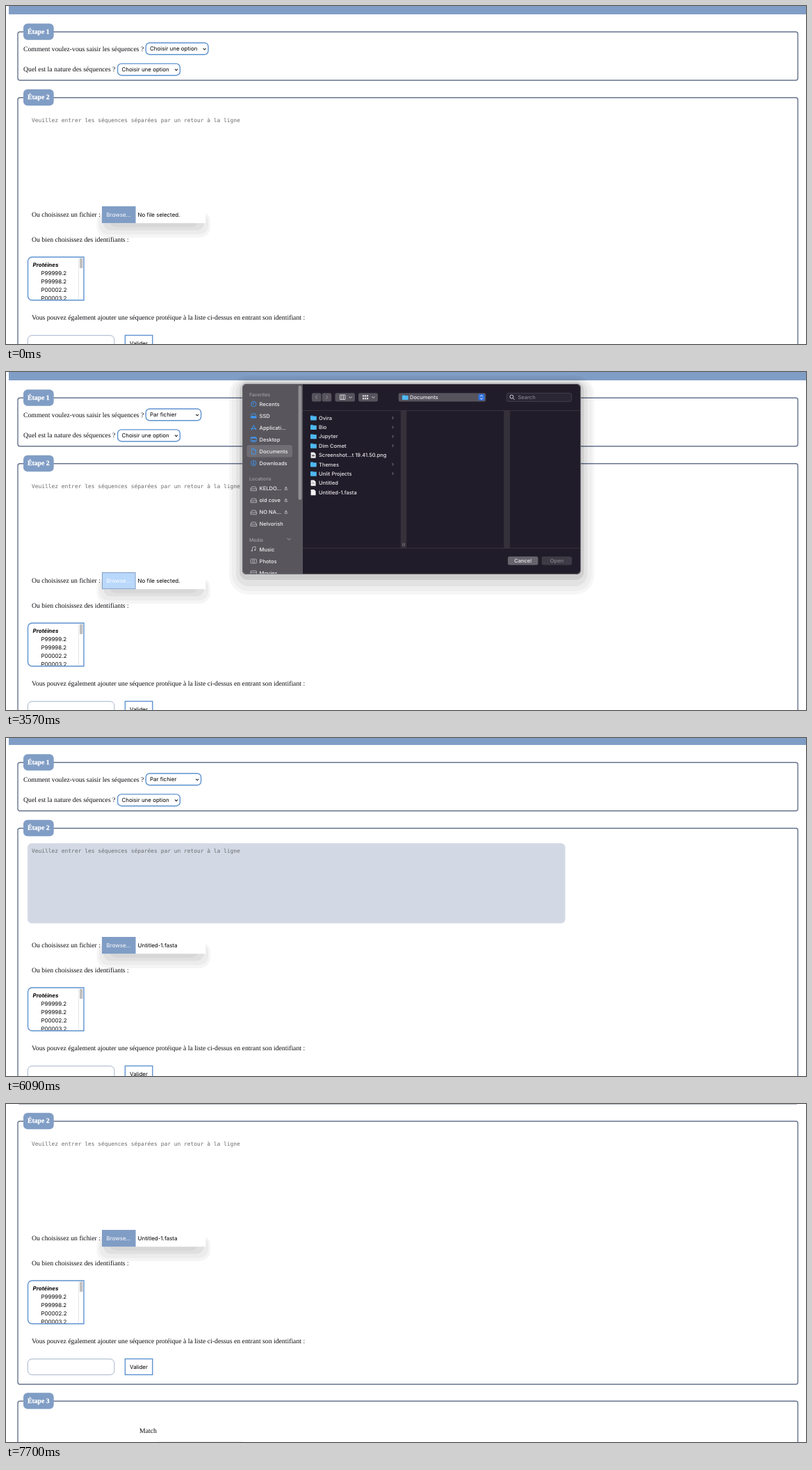
These frames come from a looping animation (1151x486 px, 8000 ms). An HTML page:

```html
<!DOCTYPE html>
<html lang="fr">
<head>
<meta charset="utf-8">
<title>Saisie de séquences</title>
<style>
html, body { margin: 0; width: 100%; height: 100%; overflow: hidden; background: #fff; }
svg { display: block; width: 1151px; height: 486px; }
text { white-space: pre; text-rendering: geometricPrecision; }
.serif { font: 9.74px "Liberation Serif", serif; fill: #0c0c12; }
.legend { font: bold 9.74px "Liberation Serif", serif; fill: #fff; stroke: #fff; stroke-width: .25px; }
.ui { font: 7.95px Inter, sans-serif; fill: #000; }
.mono { font: 7.91px "DejaVu Sans Mono", monospace; fill: #6c6c70; }
.side { font: 500 7.5px Inter, sans-serif; fill: #f1f0f2; }
.head { font: 500 6.8px Inter, sans-serif; fill: #a3a1a7; }
.file { font: 500 7.5px Inter, sans-serif; fill: #e9e8eb; }
.white { fill: #fff; }
.dim { fill: #85828c; }
.mid { text-anchor: middle; }
</style>
</head>
<body>
<svg id="stage" viewBox="0 0 1151 486" xmlns="http://www.w3.org/2000/svg"></svg>
<script>
const LOOP = 8000, STEP = 70;
const BLUE = '#809dc5', EDGE = '#5f93d0', ACCENT = '#3f97f5';

const rect = (x, y, w, h, fill, r = 0, extra = '') =>
  `<rect x="${x}" y="${y}" width="${w}" height="${h}" rx="${r}" fill="${fill}" ${extra}/>`;
const text = (x, y, cls, str, extra = '') => `<text x="${x}" y="${y}" class="${cls}" ${extra}>${str}</text>`;
const line = (d, stroke, w = 1, extra = '') =>
  `<path d="${d}" fill="none" stroke="${stroke}" stroke-width="${w}" ${extra}/>`;
const group = (id, body, extra = '') => `<g id="${id}" ${extra}>${body}</g>`;
const frame = (x, y, w, h, stroke, sw, r, fill = 'none') =>
  rect(x, y, w, h, fill, r, `stroke="${stroke}" stroke-width="${sw}"`);

// Form page

const fieldset = (y, h, n) =>
  frame(17, y, 1122.3, h, '#66748e', 1.4, 3) +
  rect(25, y - 12, 43.7, 23.4, BLUE, 6) +
  text(46.8, y + 2.6, 'legend mid', `Étape ${n}`);

const select = (x, y, w, label) =>
  frame(x + .6, y + .6, w - 1.2, 16.8, EDGE, 1.4, 5.5, '#fff') +
  text(x + 6.4, y + 11.9, 'ui', label) +
  line(`M${x + w - 8} ${y + 8.4}l2 2 2-2`, '#222', 1.1);

// Soft shadow built from nested bands: [x, y, width, height, radius, opacity]
const shadow = bands => bands.map(([x, y, w, h, r, o]) =>
  rect(x, y, w, h, '#000', r, `opacity="${o}"`)).join('');

function filePicker() {
  return shadow([
    [130.5, 295, 163.5, 38, 15, .04], [134, 297, 157, 31.5, 13, .035],
    [140, 299, 145, 23.5, 11, .05], [149, 300, 127, 18, 9, .04]
  ]) +
    rect(138, 288, 149.3, 24.2, '#fff') +
    rect(138, 288, 48.6, 24.2, BLUE) +
    rect(139, 289, 46.6, 22.2, '#b9d8fb', 0, 'id="hover"') +
    text(162, 303, 'ui white mid', 'Browse…') +
    text(189.6, 303, 'ui', 'No file selected.', 'id="fileName"');
}

function idList() {
  const ids = ['P99999.2', 'P99998.2', 'P00002.2', 'P00003.2'];
  return `<path d="M112 361H37.500a6 6 0 0 0-6 6v50a6 6 0 0 0 6 6H112z" fill="#fff" stroke="${EDGE}" stroke-width="1.400"/>` +
    line('M104.500 362V422', '#e6e6e6') +
    rect(106, 362.5, 4.4, 14.5, '#c1c1c1', 1) +
    text(38.6, 375.3, 'ui', 'Protéines', 'font-weight="700" style="font-weight:700;font-style:italic"') +
    `<g clip-path="url(#listClip)">${ids.map((s, i) => text(50.5, 386.6 + i * 12.1, 'ui', s)).join('')}</g>`;
}

const page = group('page',
  rect(4, -60, 1147, 72, BLUE) +
  fieldset(37.3, 69.5, 1) +
  text(25, 64.6, 'serif', 'Comment voulez-vous saisir les séquences ?') +
  group('choiceA', select(200.6, 52.4, 91, 'Choisir une option')) +
  group('choiceB', select(200.6, 52.4, 80.6, 'Par fichier')) +
  text(25, 94.4, 'serif', 'Quel est la nature des séquences ?') +
  select(160, 82.3, 91, 'Choisir une option') +
  fieldset(131.8, 378.2, 2) +
  rect(31, 153.3, 773.6, 115.2, '#d3d9e4', 6, 'id="area"') +
  text(37, 167.1, 'mono', 'Veuillez entrer les séquences séparées par un retour à la ligne') +
  text(37, 303.4, 'serif', 'Ou choisissez un fichier :') +
  filePicker() +
  text(37, 338.5, 'serif', 'Ou bien choisissez des identifiants :') +
  idList() +
  text(37, 450.9, 'serif', 'Vous pouvez également ajouter une séquence protéique à la liste ci-dessus en entrant son identifiant :') +
  frame(31.3, 473.7, 124.6, 22.6, '#a3b4ca', 1, 6) +
  frame(171.4, 473.5, 39.4, 22.8, EDGE, 1.4, 0) +
  text(191, 488, 'ui mid', 'Valider') +
  fieldset(534.2, 300, 3) +
  text(192, 580, 'serif', 'Match') +
  rect(212, 592, 135, 20, '#f1f1f1', 9)
);

// Option menu under the first select

const menu = group('menu',
  shadow([[195.5, 69.5, 102.5, 48, 7, .04], [198, 70.5, 97.5, 44, 5, .07]]) +
  frame(200, 71.4, 94, 40.6, '#c9c9cc', .6, 2.5, '#fff') +
  rect(200.3, 72, 93.4, 13, '#3d7be0', 2, 'id="mark"') +
  ['Manuellement', 'Par fichier', 'Par identifiant'].map((s, i) =>
    text(207, 81.4 + i * 13, 'ui opt', s)).join('')
);

// File dialog

const disk = y => line(`M352 ${y + .5}l1.500-3h5.500l1.500 3v2.700h-8.500zM352 ${y + .5}h8.500`, '#b9b7bc', .9);
const icons = {
  Recents: line('M360 46a3.700 3.700 0 1 1-7.400 0a3.700 3.700 0 1 1 7.400 0M356.300 43.500V46h-2', ACCENT, .9),
  SSD: rect(352, 63.2, 8.4, 3.2, ACCENT, 1) + line('M352.500 63l1.500-3h4.500l1.500 3', ACCENT, .9),
  'Applicati...': line('M353 83.500l3.300-7 3.300 7M352 81.500h8.500', ACCENT, 1),
  Desktop: frame(352.3, 93.8, 8, 6.4, ACCENT, .9, .8) + rect(352.3, 93.8, 8, 1.8, ACCENT) + rect(353.6, 98, 5.4, 1.3, ACCENT),
  Documents: line('M353.500 110h3.300l2.500 2.500v5.500h-5.800zM356.600 110v2.700h2.700', ACCENT, .9),
  Downloads: line('M360 131a3.700 3.700 0 1 1-7.400 0a3.700 3.700 0 1 1 7.400 0M356.300 128.700v4.300m-1.600-1.500l1.600 1.600 1.600-1.600', ACCENT, .9)
};

function sidebar() {
  const fav = Object.keys(icons).map((s, i) =>
    icons[s] + text(364.6, 48.8 + i * 17, 'side', s)).join('');
  const drives = ['KELDO...', 'old cove', 'NO NA...', 'Nelvorish'].map((s, i) => {
    const y = 167.5 + i * 17;
    const eject = i < 3 ? `<path d="M400.500 ${y}l2.300-3 2.300 3zM400.500 ${y + 1}h4.600v1.200h-4.600z" fill="#aaa8ad"/>` : '';
    return disk(y) + eject + text(364.6, y + 2.7, 'side', s);
  }).join('');
  const grey = '#b9b7bc';
  const media =
    line('M354.500 257v-5l4.500-1v5', grey, .9) + rect(352.5, 256, 2.4, 2, grey, 1) + rect(357, 255, 2.4, 2, grey, 1) +
    frame(352, 269, 8.4, 6, grey, .9, 1) + `<circle cx="356.200" cy="272" r="1.700" fill="none" stroke="${grey}" stroke-width=".8"/>` +
    frame(352, 286, 8.4, 6, grey, .9, .5) + line('M352 288.500h8.400', grey, .8) +
    ['Music', 'Photos', 'Movies'].map((s, i) => text(364.6, 257.7 + i * 17, 'side', s)).join('');
  return rect(340, 17, 87, 274, '#58565c') +
    rect(346.5, 105, 65.5, 17.4, '#706e74', 3) +
    rect(420.6, 19.5, 4.8, 164.5, '#918f95', 2.4) +
    text(350, 34.6, 'head', 'Favorites') + fav +
    text(350, 156.4, 'head', 'Locations') + drives +
    text(350, 243.6, 'head', 'Media') + line('M404.500 239l2.500 2.500 2.500-2.500', '#a3a1a7', 1) + media;
}

const folder = (x, y) => rect(x, y - 3.5, 4, 3, '#2f9bdc', .8) + rect(x, y - 2.6, 8.8, 6.2, '#4fb9f2', .8);
const sheet = (x, y) => `<path d="M${x} ${y - 4}h4.700l2.300 2.300v6h-7z" fill="#f3f3f3"/>`;
const chevron = (x, y) => line(`M${x} ${y}l2 2 2-2`, '#d8d6dc', 1);

function toolbar() {
  const box = (x, w) => rect(x, 30.2, w, 12.2, '#56535d', 2.5);
  const bars = line('M480.500 33h7.500v6.500h-7.500zM483 33v6.500M485.500 33v6.500', '#d8d6dc', .9);
  const tiles = [0, 1, 2].map(i => rect(513 + i * 3, 33.2, 2.2, 2.4, '#d8d6dc') + rect(513 + i * 3, 37, 2.2, 2.4, '#d8d6dc')).join('');
  return box(440, 13.6) + box(454.7, 13.6) +
    line('M447.800 33.800l-2.300 2.500 2.300 2.500M460.500 33.800l2.300 2.500-2.300 2.500', '#97949d', 1) +
    box(473.5, 28.5) + box(507, 28) + bars + tiles + chevron(493.5, 35.4) + chevron(526.5, 35.4) +
    box(564.7, 125.6) + folder(570, 36.5) + text(581, 39, 'file', 'Documents') +
    rect(679.6, 31.6, 9, 9.4, '#2f6fdf', 2) +
    line('M682.300 35.300l1.800-1.800 1.800 1.800M682.300 37.500l1.800 1.800 1.800-1.800', '#fff', 1) +
    frame(720.4, 30.4, 93.2, 12, '#4a4653', .8, 2.5, '#2b2634') +
    `<circle cx="727.500" cy="35.600" r="2.500" fill="none" stroke="#d8d6dc"/>` + line('M729.400 37.500l2.200 2.300', '#d8d6dc', 1) +
    text(736.5, 39.1, 'file dim', 'Search');
}

const files = ['Ovira', 'Bio', 'Jupyter', 'Dim Comet', 'Screenshot...t 19.41.50.png', 'Themes', 'Unlit Projects', 'Untitled', 'Untitled-1.fasta'];
const fileRow = (name, i) => {
  const y = 66 + i * 13.36, plain = [4, 7, 8].includes(i);
  return (plain ? sheet(438.6, y) : folder(438, y) + line(`M555.600 ${y - 2}l1.800 2-1.800 2`, '#8b8892', .9)) +
    (i === 4 ? rect(440, y - .5, 4, 2.5, '#77747e') : i === 7 ? line(`M440 ${y - 1}h3m-3 2h4`, '#8b8892', .8) : '') +
    text(450, y + 2.7, 'file', name);
};

const preview = group('preview',
  rect(576, 56, 250.5, 197, '#211c29') +
  '<path d="M676 80h36l14 14v54h-50z" fill="#f3f3f3"/><path d="M712 80v14h14z" fill="#c9c8cc"/>' +
  text(590, 196, 'file', 'Untitled-1.fasta', 'style="font-weight:700"') +
  text(590, 206, 'file dim', 'Document - 1 KB') +
  text(590, 223, 'file', 'Information') +
  text(590, 235, 'file dim', 'Created')
);

const dialog = group('dialog',
  shadow([
    [321, 5, 525.5, 315, 28, .035], [325, 8, 517.5, 307, 24, .03],
    [331, 11, 505.5, 297, 18, .05], [336, 14, 495.5, 285, 12, .09]
  ]) +
  `<g clip-path="url(#dialogClip)">` +
  rect(340, 17, 487, 274, '#211c29') + sidebar() + toolbar() +
  line('M427 55.500H827M427 253.300H827', '#3a3642', .9) +
  rect(567.8, 56, 8.6, 197, '#35313b') + rect(716.3, 56, 8.8, 197, '#35313b') +
  line('M571 246v4.500M573.300 246v4.500', '#8b8892', .8) +
  rect(433, 166.6, 130, 13, '#1f5bcb', 2.5, 'id="row"') +
  files.map(fileRow).join('') + preview +
  rect(722, 265.2, 43.5, 12.4, '#67646d', 2.5) + text(743.7, 274.2, 'file mid', 'Cancel') +
  rect(770.8, 265.2, 43.4, 12.4, '#3e3a46', 2.5, 'id="openBox"') +
  text(792.5, 274.2, 'file mid dim', 'Open', 'id="openText"') +
  '</g>' + frame(340.4, 17.4, 486.2, 273, '#77757b', .9, 6)
);

const stage = document.getElementById('stage');
stage.innerHTML =
  '<defs><clipPath id="listClip"><rect x="32" y="362" width="72" height="60.300"/></clipPath>' +
  '<clipPath id="dialogClip"><rect x="340" y="17" width="487" height="274" rx="6"/></clipPath></defs>' +
  page + menu + dialog;

// Timeline

const $ = id => document.getElementById(id);
const options = [...document.querySelectorAll('.opt')];
const show = (id, on) => $(id).setAttribute('visibility', on ? 'visible' : 'hidden');
const fade = (id, o) => $(id).setAttribute('opacity', o);
const ramp = (t, a, b) => Math.min(1, Math.max(0, (t - a) / (b - a)));
const smooth = p => p * p * (3 - 2 * p);

// Scroll gestures: [start, positions held for one step each]
const gestures = [
  [6090, [2, 7, 10]],
  [6860, [16, 28, 42, 53, 58]],
  [7490, [66, 84, 99, 107]]
];
function scrollAt(t) {
  let y = 0;
  for (const [start, stops] of gestures)
    if (t >= start) y = stops[Math.min(stops.length - 1, Math.floor((t - start) / STEP))];
  return y;
}

function draw(time) {
  const t = Math.floor(time / STEP) * STEP;
  $('page').setAttribute('transform', `translate(0 ${-scrollAt(t)})`);

  const picked = t >= 2450;
  show('choiceA', !picked);
  show('choiceB', picked);

  fade('menu', t < 1680 ? 0 : 1 - ramp(t, 2310, 2520));
  const hot = t < 1890 ? -1 : t < 2030 ? 0 : 1;
  fade('mark', hot < 0 ? 0 : 1);
  $('mark').setAttribute('y', hot > 0 ? 85 : 72);
  options.forEach((o, i) => o.style.fill = i === hot ? '#fff' : '#000');

  fade('hover', smooth(ramp(t, 3010, 3430)) * (1 - smooth(ramp(t, 3570, 4130))));
  fade('dialog', t < 5250 ? ramp(t, 3360, 3570) : 0);
  fade('row', t >= 4620 ? 1 : 0);
  fade('preview', t >= 4690 ? 1 : 0);
  $('openBox').setAttribute('fill', t >= 4620 ? '#2f6fdf' : '#3e3a46');
  $('openText').style.fill = t >= 4620 ? '#fff' : '#85828c';

  $('fileName').textContent = t >= 5390 ? 'Untitled-1.fasta' : 'No file selected.';
  show('area', t >= 5530 && t < 7630);
}

const begin = performance.now();
function tick() {
  draw((performance.now() - begin) % LOOP);
  requestAnimationFrame(tick);
}
draw(0);
requestAnimationFrame(tick);
</script>
</body>
</html>
```
